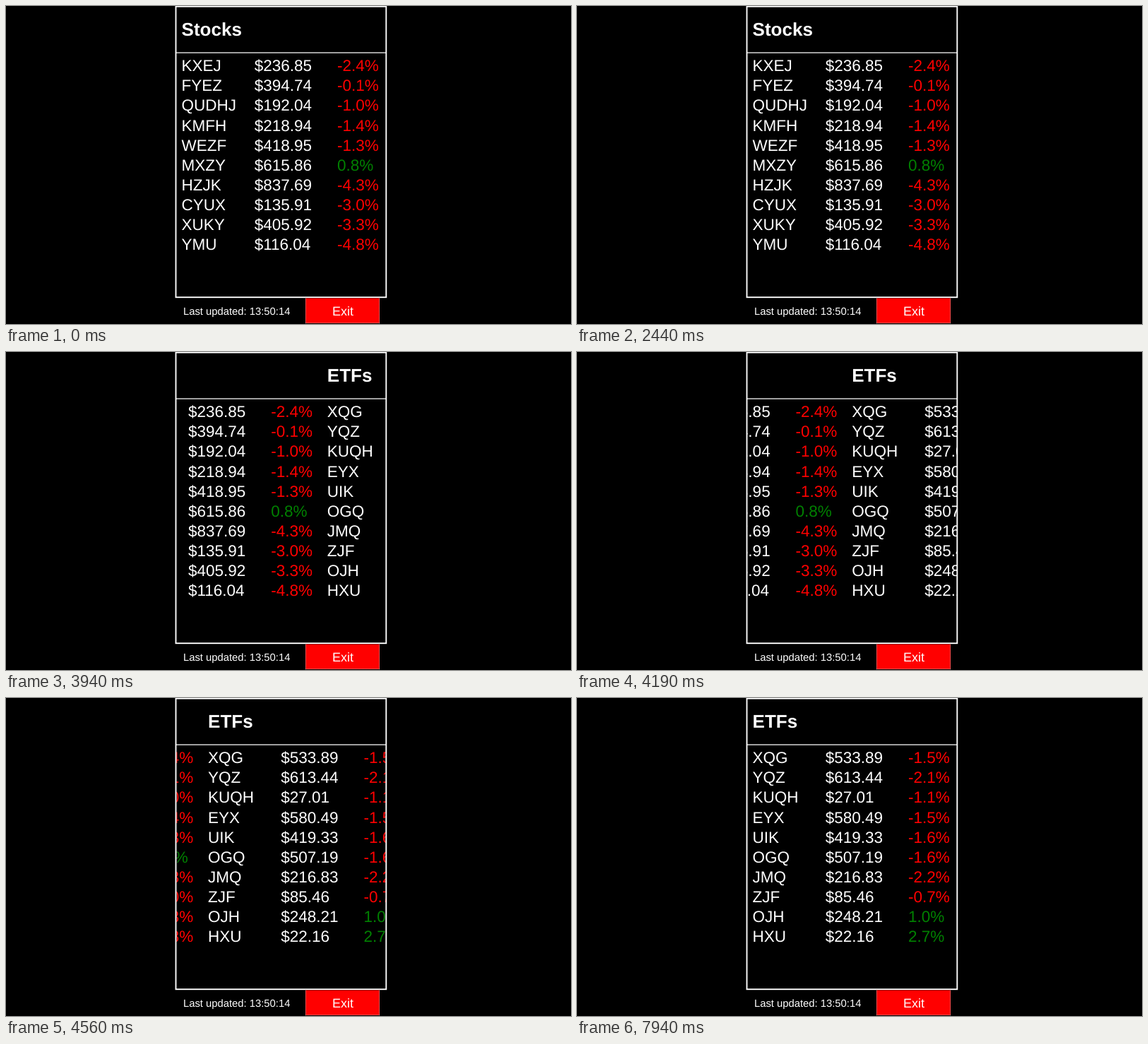
Write an HTML page that moves like this. It is 800 px wide and 450 px high and loops after 8000 ms.

```html
<!DOCTYPE html>
<html lang="en">
<head>
<title>Ticker board</title>
<style>
  html, body { margin: 0; width: 100%; height: 100%; overflow: hidden; background: #000; }
  svg { display: block; width: 800px; height: 450px; }
  text { font: 22.5px "Liberation Sans", Arial, sans-serif; fill: #fff; text-rendering: geometricPrecision; }
  .title { font-size: 26px; font-weight: bold; }
  .updated { font-size: 14.8px; }
  .exit { font-size: 18px; text-anchor: middle; }
  .down { fill: #f00; }
  .up { fill: #008000; }
</style>
</head>
<body>
<svg viewBox="0 0 800 450">
  <clipPath id="window"><rect x="240" y="0" width="299" height="413"/></clipPath>
  <g clip-path="url(#window)"><g id="strip"></g></g>
  <rect x="240.5" y="0.7" width="297.8" height="411.5" fill="none" stroke="#fff" stroke-width="1.9"/>
  <path d="M240 66.2H539" stroke="#fff" stroke-width="1.3"/>
  <rect x="424" y="413.5" width="105" height="35.5" fill="#f00"/>
  <path d="M424.5 414V449M528.5 414V449M424 448.5H529" stroke="#fff" stroke-opacity=".6" stroke-dasharray="1 1"/>
  <text class="updated" x="251" y="437">Last updated: 13:50:14</text>
  <text class="exit" x="477" y="438">Exit</text>
</svg>
<script>
const LOOP = 8000;
const PAGE_WIDTH = 300;
const ROW_HEIGHT = 28.125;
const LEFT = 248.6;

// Each row: symbol, price, change in percent
const pages = [
  { title: "Stocks", rows: [
    "KXEJ 236.85 -2.4", "FYEZ 394.74 -0.1", "QUDHJ 192.04 -1.0", "KMFH 218.94 -1.4",
    "WEZF 418.95 -1.3", "MXZY 615.86 0.8", "HZJK 837.69 -4.3", "CYUX 135.91 -3.0",
    "XUKY 405.92 -3.3", "YMU 116.04 -4.8"] },
  { title: "ETFs", rows: [
    "XQG 533.89 -1.5", "YQZ 613.44 -2.1", "KUQH 27.01 -1.1", "EYX 580.49 -1.5",
    "UIK 419.33 -1.6", "OGQ 507.19 -1.6", "JMQ 216.83 -2.2", "ZJF 85.46 -0.7",
    "OJH 248.21 1.0", "HXU 22.16 2.7"] }
];

const strip = document.getElementById("strip");

function addText(content, x, y, className = "") {
  const node = document.createElementNS("http://www.w3.org/2000/svg", "text");
  node.setAttribute("x", x);
  node.setAttribute("y", y);
  node.setAttribute("class", className);
  node.textContent = content;
  strip.append(node);
}

pages.forEach(({ title, rows }, page) => {
  const x = LEFT + page * PAGE_WIDTH;
  addText(title, x, 42, "title");
  rows.forEach((row, i) => {
    const [symbol, price, change] = row.split(" ");
    const y = 92.2 + i * ROW_HEIGHT;
    addText(symbol, x, y);
    addText("$" + price, x + 103.1, y);
    addText(change + "%", x + 220.3, y, change < 0 ? "down" : "up");
  });
});

// The strip slides in 32 equal notches, seen at 16 pictures per second.
function scrollAt(time) {
  const tick = Math.floor((time - 3622) / 62.5);
  const notch = tick < 0 ? 0 : Math.min(32, Math.floor(1 + tick * 9 / 5));
  return notch * PAGE_WIDTH / 32;
}

function draw() {
  const time = performance.now() % LOOP;
  strip.setAttribute("transform", `translate(${-scrollAt(time)} 0)`);
  requestAnimationFrame(draw);
}
draw();
</script>
</body>
</html>
```
